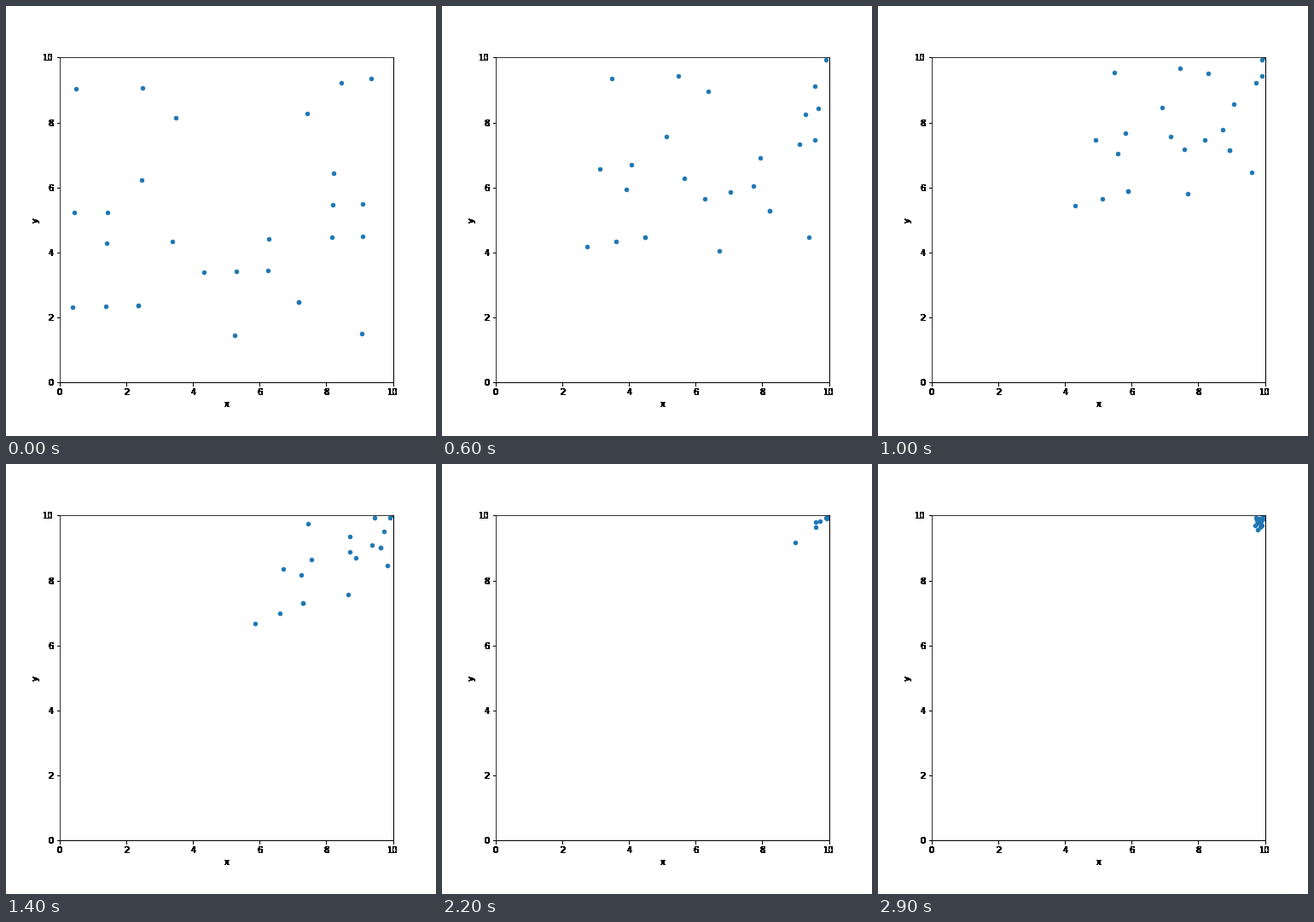
Recreate the animation shown at these times as a matplotlib script. Size 504 px wide and 504 px high, loop 3000 ms.

```python
import matplotlib.pyplot as plt
import numpy as np
from matplotlib.animation import FuncAnimation

FRAMES = 30
STEP = 0.5
GOAL = 10.0

# Occupied grid columns in each row; a repeated column holds two particles.
ROWS = {
    9: (0, 2, 8, 9),
    8: (3, 7),
    6: (2, 8),
    5: (0, 1, 8, 9),
    4: (1, 3, 6, 8, 9),
    3: range(4, 7),
    2: (*range(3), 2, 7, 7),
    1: (5, 9),
}
START = np.array([(x, y) for y, columns in ROWS.items() for x in columns])
OFFSET = GOAL - START
DISTANCE = np.linalg.norm(OFFSET, axis=1)
HEADING = OFFSET / DISTANCE[:, None]


def positions(steps):
    """Walk straight to the goal, then hop back and forth across it."""
    arrival = DISTANCE // STEP
    overshoot = np.maximum(steps - arrival, 0) % 2
    travelled = (np.minimum(steps, arrival) + overshoot) * STEP
    return START + HEADING * travelled[:, None]


def harden(image, dpi):
    """Turn every touched pixel solid black."""
    solid = np.zeros_like(image)
    solid[..., 3] = image[..., 3] > 0
    return solid, 0, 0


plt.rcParams.update({"font.family": "DejaVu Sans", "font.size": 10})
fig = plt.figure(figsize=(7, 7), dpi=72, facecolor="white")
ax = fig.add_axes([0.125, 0.125, 0.775, 0.755])
ax.set(xlim=(0, 10), ylim=(0, 10), xlabel="x", ylabel="y")

# Everything outside the plot area has hard, aliased edges.
for part in (ax.xaxis, ax.yaxis, ax.spines["right"], ax.spines["bottom"]):
    part.set_agg_filter(harden)

dots, = ax.plot([], [], "o", color="#1f77b4", markersize=4.5)


def update(frame):
    dots.set_data(*positions(frame + 1).T)
    return dots,


anim = FuncAnimation(fig, update, frames=FRAMES, interval=100,
                     repeat=True, repeat_delay=0, blit=False)
plt.show()
```
